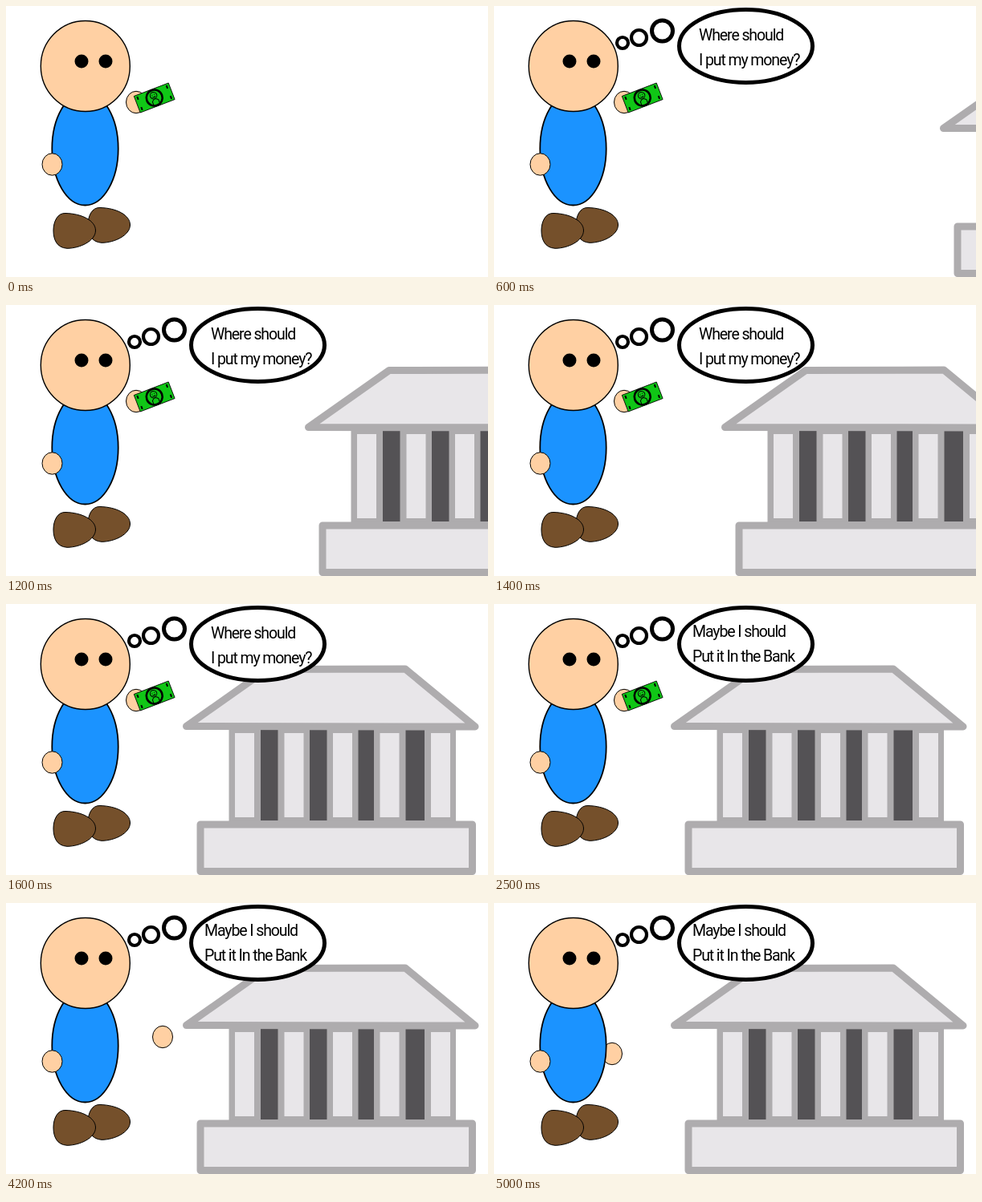
Animation, 600 px wide and 338 px high, one loop 5.1 s. Source, as an HTML page:

```html
<!DOCTYPE html>
<html lang="en">
<head>
<meta charset="utf-8">
<title>Where should I put my money?</title>
<style>
  html, body { margin: 0; width: 100%; height: 100%; overflow: hidden; background: #fff; }
  svg { display: block; width: 100%; height: 100%; }
  text { font: 19.5px Roboto, "Open Sans", sans-serif; letter-spacing: -1.1px; }
  .skin { fill: #ffd0a3; stroke: #000; }
  .stone { fill: #e8e6e9; stroke: #aeacae; stroke-width: 9; stroke-linejoin: round; }
  .cloud { fill: #fff; stroke: #000; }
  .line { fill: none; stroke: #000; }
</style>
</head>
<body>
<svg viewBox="0 0 600 338">
  <defs>
    <path id="shoe" d="M74 258.5C95 259 111.5 268 111.5 280C111.5 293 92 302.3 76 302.3C63 301.5 59 291 59 280C59 269 64 258 74 258.5Z" fill="#75502b" stroke="#000"/>
  </defs>

  <g id="bank">
    <path fill="#aeacae" d="M277.5 155H560V275H277.5Z"/>
    <g id="columns"></g>
    <path class="stone" d="M224.5 152.5L325 81.5L497 81L584 153Z"/>
    <path class="stone" d="M242 275H580.5V333.5H242Z"/>
  </g>

  <g class="cloud" stroke-width="4.2">
    <circle class="pop" cx="160" cy="46" r="7"/>
    <circle class="pop" cx="180.5" cy="39.5" r="9.5"/>
    <circle class="pop" cx="209.5" cy="31" r="13" stroke-width="5"/>
    <ellipse class="pop" cx="313.5" cy="50" rx="83" ry="45.5" stroke-width="5"/>
  </g>
  <g id="question"><text x="255" y="43">Where should</text><text x="255" y="74">I put my money?</text></g>
  <g id="answer"><text x="247" y="41">Maybe I should</text><text x="247" y="72">Put it In the Bank</text></g>

  <g id="hand">
    <ellipse class="skin" rx="12.5" ry="13.7"/>
    <g id="note" transform="translate(22.7 -5.5) rotate(-21)">
      <path d="M-23 -11H23V11H-23Z" fill="#10c616" stroke="#000" stroke-width=".8"/>
      <path class="line" stroke-width="2" d="M-19.5 -9v4M-19.5 5v4M19.5 -9v4M19.5 5v4"/>
      <circle class="line" r="10" stroke-width="2.6"/>
      <circle class="line" cy="-3" r="4.2"/>
      <path class="line" d="M-1.5 -4.5v1M1.5 -4.5v1M-2 -1.5Q0 0 2 -1.5M-4 8V4Q0 -1 4 4V8"/>
    </g>
  </g>

  <use href="#shoe" x="43" y="-7"/>
  <use href="#shoe"/>
  <ellipse cx="98.5" cy="178" rx="41.2" ry="70.5" fill="#1b93ff" stroke="#000" stroke-width="1.8"/>
  <ellipse class="skin" cx="98.8" cy="75" rx="55.5" ry="56.5" stroke-width="1.4"/>
  <circle cx="94" cy="69" r="8.5"/>
  <circle cx="124" cy="69" r="8.5"/>
  <ellipse class="skin" cx="57.5" cy="197.5" rx="12.5" ry="13.7"/>
</svg>
<script>
const LOOP = 5100, STEP = 100;
const $ = id => document.getElementById(id);
const pops = document.querySelectorAll('.pop');

const column = (x, w, y, h, fill) =>
  `<rect x="${x}" y="${y}" width="${w}" height="${h}" fill="${fill}"/>`;
$('columns').innerHTML =
  [285, 346.5, 407, 465.5, 529].map(x => column(x, 24, 161, 105, '#e8e6e9')).join('') +
  [[317, 21.5], [378, 21.5], [438.5, 19.5], [497.5, 23.5]]
    .map(([x, w]) => column(x, w, 157, 113, '#545255')).join('');

// Keys are [time, ...values]
const bankKeys = [[400, 395], [600, 335], [1200, 152], [1400, 63], [1600, 0]];
const handKeys = [[3500, 162, 120], [4000, 210, 155], [4100, 203, 161],
  [4200, 195, 167], [4700, 160, 188], [5000, 147, 188]];

function sample(keys, t) {
  const next = keys.findIndex(k => k[0] >= t);
  if (next < 0) return keys[keys.length - 1].slice(1);
  if (next === 0) return keys[0].slice(1);
  const a = keys[next - 1], b = keys[next];
  const u = (t - a[0]) / (b[0] - a[0]);
  return a.slice(1).map((v, i) => v + (b[i + 1] - v) * u);
}

const show = (el, on) => el.setAttribute('visibility', on ? 'visible' : 'hidden');
const move = (el, x, y = 0) => el.setAttribute('transform', `translate(${x} ${y})`);

function draw(now) {
  const t = Math.floor(now % LOOP / STEP) * STEP;
  pops.forEach((el, i) => show(el, t >= 100 * (i + 1)));
  show($('question'), t >= 400 && t < 2300);
  show($('answer'), t >= 2300);
  show($('note'), t < 4100);
  move($('bank'), ...sample(bankKeys, t));
  move($('hand'), ...sample(handKeys, t));
}

const start = performance.now();
function tick() {
  draw(performance.now() - start);
  requestAnimationFrame(tick);
}
tick();
</script>
</body>
</html>
```
